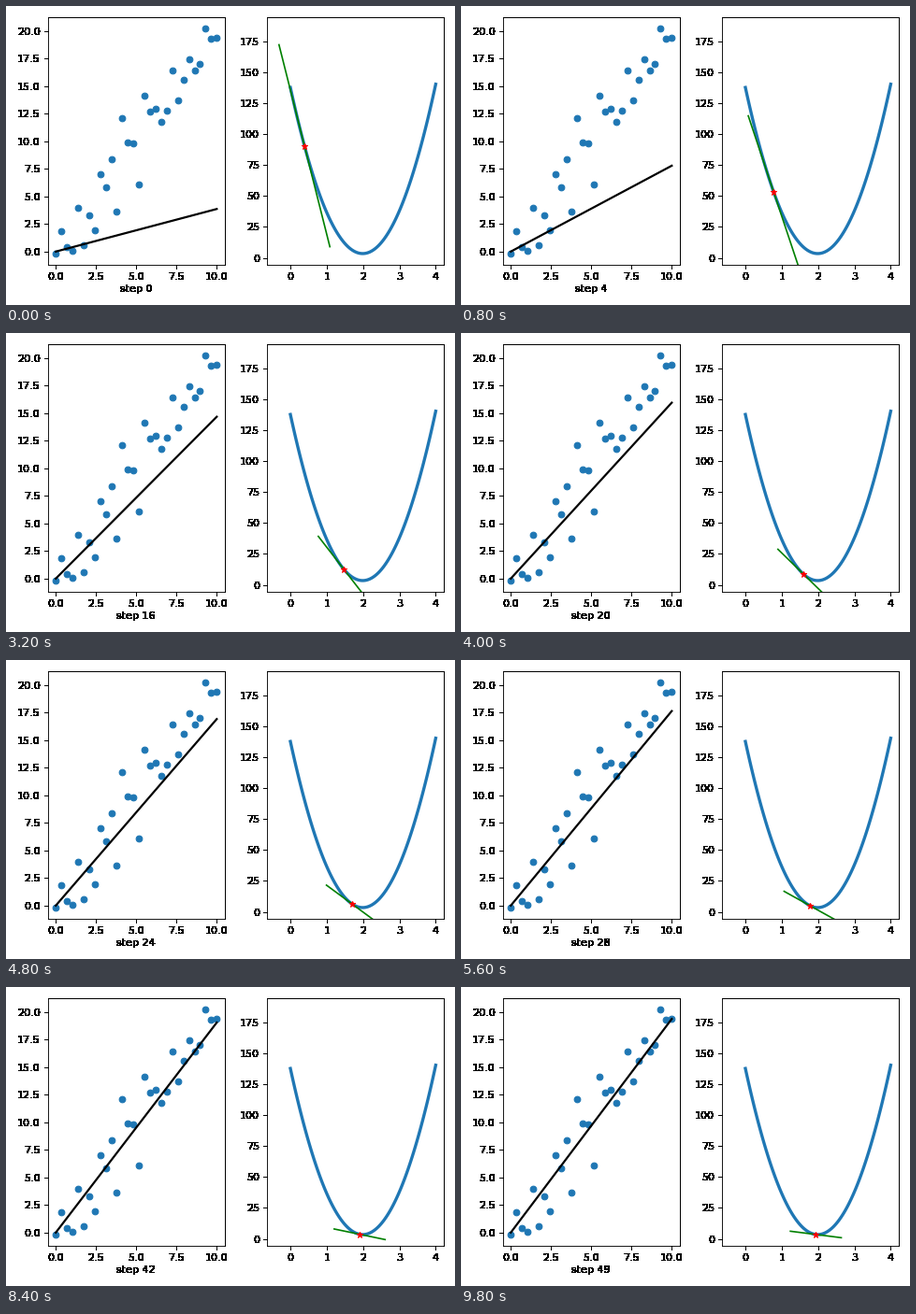
Recreate the animation shown at these times as a matplotlib script. Size 480 by 320 pixels, loop 10 s.

```python
import numpy as np
import matplotlib.pyplot as plt
from matplotlib.animation import FuncAnimation

W, H, DPI = 480, 320, 80
STEPS, RATE, START, REACH = 50, 0.001, 0.27, 0.7

x = np.linspace(0, 10, 30)
y = np.array([-0.18, 1.88, 0.42, 0.08, 4.0, 0.62, 3.33, 1.97, 7.0, 5.87,
              8.42, 3.67, 12.1, 9.88, 9.8, 6.06, 14.12, 12.7, 12.95, 11.77,
              12.78, 16.42, 13.7, 15.58, 17.45, 16.42, 17.02, 20.25, 19.3, 19.4])


def loss(w):
    return np.mean((w * x - y) ** 2)


def grad(w):
    return np.mean(2 * x * (w * x - y))


def tangent(w, slope):
    xs = np.array([w - REACH, w + REACH])
    return xs, loss(w) + slope * (xs - w)


def solid(img, dpi):
    """Turn every touched pixel fully black, for crisp heavy lettering."""
    out = np.zeros_like(img)
    out[..., 3] = img[..., 3] > 0
    return out, 0, 0


def make_axes(left, right, bottom=43, top=308):
    ax = fig.add_axes([left / W, bottom / H, (right - left) / W, (top - bottom) / H])
    ax.xaxis.set_agg_filter(solid)
    ax.yaxis.set_agg_filter(solid)
    for side in ("top", "right"):
        ax.spines[side].set_linewidth(0.9)
    return ax


# weight and slope used at each descent step
path = []
w = START
for _ in range(STEPS):
    g = grad(w)
    w -= RATE * g
    path.append((w, g))

fig = plt.figure(figsize=(W / DPI, H / DPI), dpi=DPI, facecolor="white")
fit_ax = make_axes(44.6, 233.9)
loss_ax = make_axes(278.7, 468)

fit_ax.scatter(x, y)
fit_line, = fit_ax.plot(x, START * x, "k", lw=2)
label = fig.text(139.25 / W, 14 / H, "step 0", ha="center", va="baseline",
                 fontsize=10)
label.set_agg_filter(solid)

ws = np.linspace(0, 4, 100)
loss_ax.plot(ws, [loss(v) for v in ws], lw=3)
slope_line, = loss_ax.plot(*tangent(START, grad(START)), "g")
star, = loss_ax.plot([START], [loss(START)], "r*")


def update(i):
    w, g = path[i]
    fit_line.set_ydata(w * x)
    slope_line.set_data(*tangent(w, g))
    star.set_data([w], [loss(w)])
    label.set_text(f"step {i}")
    return fit_line, slope_line, star, label


def reset():
    return update(0)


anim = FuncAnimation(fig, update, frames=STEPS, init_func=reset,
                     interval=200, repeat=True)
plt.show()
```
